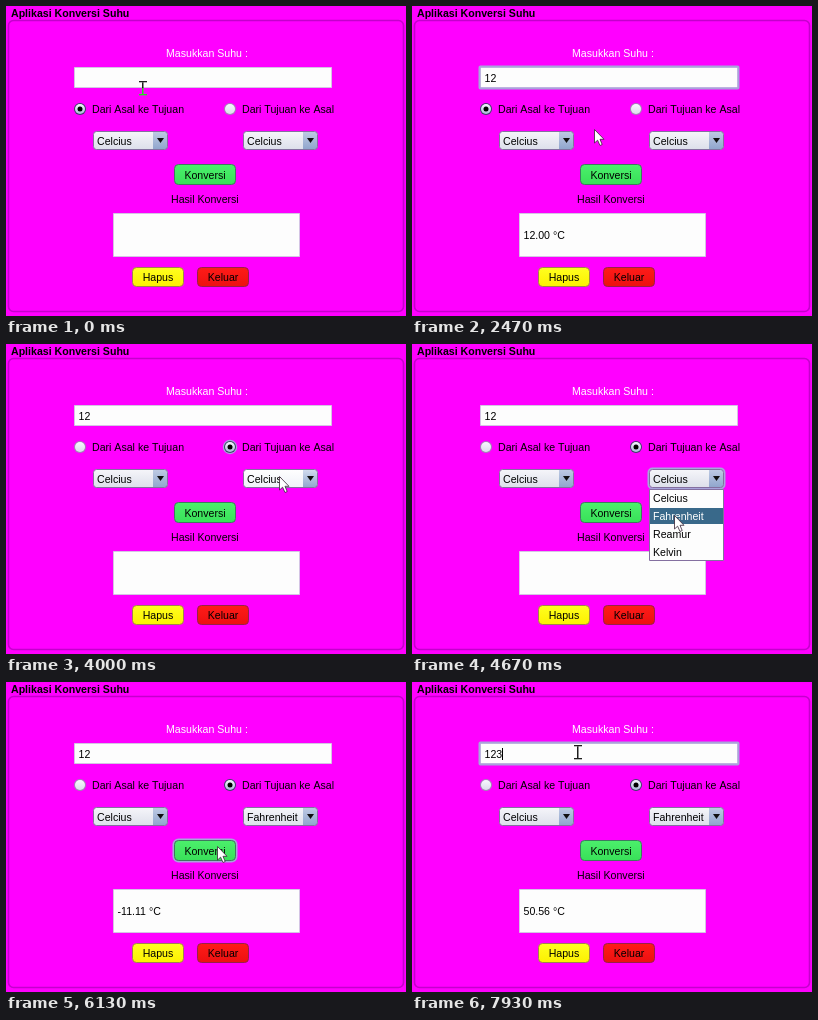
An HTML page with a canvas that plays this animation: 400 px wide and 310 px high, repeating every 8 s.

```html
<!DOCTYPE html>
<html lang="id">
<head>
<meta charset="utf-8">
<title>Konversi Suhu</title>
<style>
html, body { margin: 0; width: 100%; height: 100%; overflow: hidden; background: #f0f; }
canvas { display: block; width: 400px; height: 310px; }
</style>
</head>
<body>
<canvas id="stage"></canvas>
<script>
const LOOP = 8000;
const UNITS = ['Celcius', 'Fahrenheit', 'Reamur', 'Kelvin'];
const FIELD = [68, 61, 258, 21];
const RESULT = [107, 207, 187, 44];
const COMBO_X = 237, COMBO_Y = 125, ITEM_H = 18;
const PAPER = '#fdfdfd', RING = '#a8a4dc';
const canvas = document.getElementById('stage');
const ctx = canvas.getContext('2d');
const scale = window.devicePixelRatio || 1;
canvas.width = 400 * scale;
canvas.height = 310 * scale;

// Pointer path: time, x, y.
const path = [
  [0, 137, 82], [300, 137, 82], [600, 136, 79], [2200, 136, 79],
  [2470, 182, 123], [2850, 223, 103], [3550, 223, 103], [4000, 273, 132],
  [4300, 273, 132], [4700, 262, 172], [5000, 262, 172], [5450, 211, 164],
  [6350, 211, 164], [6730, 168, 85], [7000, 166, 70], [LOOP, 166, 70]
];

// Each event changes part of the form.
const events = [
  [0, { value: '', result: '', focus: '', reverse: false, unit: 0, open: false }],
  [600, { focus: 'field' }],
  [1600, { value: '1', result: '1.00 °C' }],
  [1800, { value: '12', result: '12.00 °C' }],
  [2930, { focus: 'radio', reverse: true, result: '' }],
  [4130, { focus: 'combo', open: true }],
  [4930, { unit: 1, open: false }],
  [5670, { focus: 'button', result: '-11.11 °C' }],
  [7060, { focus: 'field' }],
  [7870, { value: '123', result: '50.56 °C' }]
];

function stateAt(t) {
  const past = events.filter(([time]) => time <= t);
  return Object.assign({ since: past[past.length - 1][0] }, ...past.map(e => e[1]));
}

function pointerAt(t) {
  const i = path.findIndex(p => p[0] > t);
  const [t0, x0, y0] = path[i - 1], [t1, x1, y1] = path[i];
  const p = (t - t0) / (t1 - t0), k = p * p * (3 - 2 * p);
  return [x0 + (x1 - x0) * k, y0 + (y1 - y0) * k];
}

const inside = ([px, py], [x, y, w, h]) => px >= x && px <= x + w && py >= y && py <= y + h;

function text(s, x, y, color = '#000', weight = '', align = 'left') {
  ctx.font = `${weight} 10.6px "Liberation Sans", Arial, sans-serif`;
  ctx.fillStyle = color;
  ctx.textAlign = align;
  ctx.fillText(s, x, y);
}

function box(x, y, w, h, r, fill, stroke, width = 1) {
  ctx.beginPath();
  ctx.roundRect(x + .5, y + .5, w - 1, h - 1, r);
  if (fill) { ctx.fillStyle = fill; ctx.fill(); }
  if (stroke) { ctx.strokeStyle = stroke; ctx.lineWidth = width; ctx.stroke(); }
}

const focusRing = (x, y, w, h, r) => box(x - 1, y - 1, w + 2, h + 2, r, null, RING, 2);

function shade(y, h, top, bottom) {
  const g = ctx.createLinearGradient(0, y, 0, y + h);
  g.addColorStop(0, top);
  g.addColorStop(1, bottom);
  return g;
}

function textBox([x, y, w, h], value, baseline, focused) {
  box(x, y, w, h, 0, PAPER, '#d4c4e4');
  if (focused) focusRing(x, y, w, h, 1);
  text(value, x + 4.5, baseline);
}

function radio(x, label, selected, focused) {
  const y = 103;
  const disc = (r, color) => {
    ctx.beginPath();
    ctx.arc(x, y, r, 0, 7);
    ctx.fillStyle = color;
    ctx.fill();
  };
  if (focused) disc(7.2, RING);
  disc(6, selected ? '#3c4268' : '#a088b4');
  disc(5, shade(y - 5, 10, '#f8f8ff', selected ? '#a8b8d8' : '#dcdcec'));
  if (selected) disc(2.5, '#000');
  text(label, x + 12, 107);
}

function combo(x, label, focused, hovered) {
  const y = COMBO_Y, w = 75, h = 19;
  if (focused) focusRing(x, y, w, h, 4);
  box(x, y, w, h, 3, hovered ? shade(y, h, '#fff', '#eff1f8') : shade(y, h, '#f6f6fa', '#dcdfea'));
  ctx.save();
  ctx.clip();
  ctx.fillStyle = shade(y, h, hovered ? '#d4def0' : '#c0cce4', '#8ea4cc');
  ctx.fillRect(x + 60, y, 15, h);
  ctx.restore();
  box(x, y, w, h, 3, null, '#8470a0');
  ctx.beginPath();
  ctx.moveTo(x + 64, y + 7);
  ctx.lineTo(x + 71, y + 7);
  ctx.lineTo(x + 67.5, y + 12);
  ctx.fillStyle = '#111';
  ctx.fill();
  text(label, x + 4, 139);
}

function button(x, y, w, h, label, top, bottom, border, focused) {
  if (focused) focusRing(x, y, w, h, 5);
  box(x, y, w, h, 4, shade(y, h, top, bottom), border);
  text(label, x + w / 2, y + h / 2 + 4, '#000', '', 'center');
}

function popup(pointer) {
  const y = COMBO_Y + 20;
  box(COMBO_X, y, 75, ITEM_H * UNITS.length, 0, PAPER, '#8470a0');
  const hovered = Math.max(0, Math.floor((pointer[1] - y) / ITEM_H));
  UNITS.forEach((unit, i) => {
    const top = y + i * ITEM_H;
    if (i === hovered) {
      ctx.fillStyle = '#39698a';
      ctx.fillRect(COMBO_X + 1, top + 1, 73, ITEM_H - 2);
    }
    text(unit, COMBO_X + 4, top + 13, i === hovered ? '#fff' : '#000');
  });
}

function beam(x, y) {
  ctx.save();
  ctx.globalCompositeOperation = 'difference';
  ctx.fillStyle = '#e0e0e0';
  x = Math.round(x);
  y = Math.round(y);
  ctx.fillRect(x - 1, y - 6, 1.5, 12);
  for (const edge of [y - 7, y + 6]) ctx.fillRect(x - 4, edge, 8, 1.3);
  ctx.restore();
}

function arrow(x, y) {
  ctx.save();
  ctx.translate(Math.round(x), Math.round(y));
  const outline = new Path2D('M.5 .5V14L3.6 11.2L6 16.5L8.2 15.5L6 10.3H10Z');
  ctx.fillStyle = '#fff';
  ctx.strokeStyle = '#3a2638';
  ctx.lineWidth = .8;
  ctx.fill(outline);
  ctx.stroke(outline);
  ctx.restore();
}

function draw(t) {
  const s = stateAt(t), pointer = pointerAt(t);
  ctx.setTransform(scale, 0, 0, scale, 0, 0);
  ctx.fillStyle = '#f0f';
  ctx.fillRect(0, 0, 400, 310);

  box(2, 14, 396, 292, 5, null, '#c400cc', 1.6);
  text('Aplikasi Konversi Suhu', 5, 11, '#000', 'bold');
  text('Masukkan Suhu :', 160, 51, '#fff');

  const typing = s.focus === 'field';
  textBox(FIELD, s.value, 76, typing);
  if (typing && (t - s.since) % 1000 < 500) {
    ctx.fillStyle = '#000';
    ctx.fillRect(Math.round(72.5 + ctx.measureText(s.value).width), 66, 1, 12);
  }

  radio(74, 'Dari Asal ke Tujuan', !s.reverse, false);
  radio(224, 'Dari Tujuan ke Asal', s.reverse, s.focus === 'radio');
  combo(87, UNITS[0]);
  combo(COMBO_X, UNITS[s.unit], s.focus === 'combo', inside(pointer, [COMBO_X, COMBO_Y, 75, 19]));
  button(168, 158, 62, 21, 'Konversi', '#4cf06c', '#38e058', '#407860', s.focus === 'button');
  text('Hasil Konversi', 165, 197);
  textBox(RESULT, s.result, 233);
  button(126, 261, 52, 20, 'Hapus', '#ffff20', '#fcf000', '#a08050');
  button(191, 261, 52, 20, 'Keluar', '#ff1c18', '#ec1010', '#982048');

  if (s.open) popup(pointer);
  (inside(pointer, FIELD) ? beam : arrow)(...pointer);
}

function frame() {
  draw(performance.now() % LOOP);
  requestAnimationFrame(frame);
}
frame();
</script>
</body>
</html>
```
